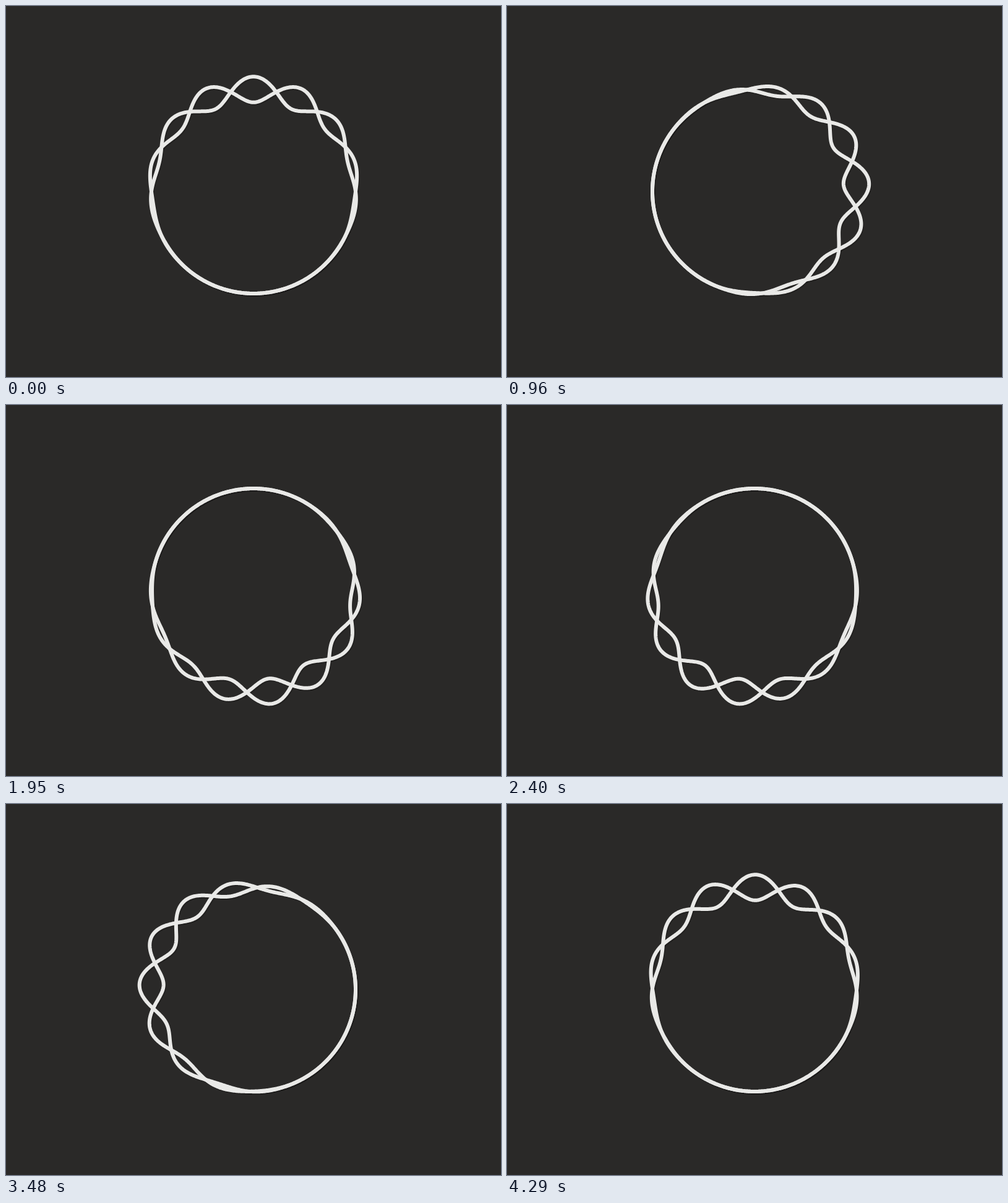
These frames come from a looping animation (800 px wide and 600 px high, 4.32 s). An HTML page with a canvas:

```html
<!DOCTYPE html>
<html lang="en">
<head>
<meta charset="utf-8">
<title>Braided ring</title>
<style>
html, body { margin: 0; width: 100%; height: 100%; overflow: hidden; background: #2a2928; }
canvas { display: block; }
</style>
</head>
<body>
<canvas id="stage" width="800" height="600"></canvas>
<script>
const ctx = document.getElementById('stage').getContext('2d');
const LOOP = 4320, STEP = 30;
const RADIUS = 165, SWING = 20.8, FALLOFF = 2.7, WAVES = 7, STEPS = 720;
const TAU = Math.PI * 2;

// One strand: a circle with a wave that swells around the clockwise-moving head.
function strand(p, sign) {
  const path = new Path2D();
  for (let i = 0; i < STEPS; i++) {
    const a = TAU * i / STEPS;
    const swell = Math.pow((1 + Math.cos(a - TAU * p)) / 2, FALLOFF);
    const r = RADIUS + sign * SWING * swell * Math.cos(WAVES * a + 3 * Math.PI * p);
    path.lineTo(400 + r * Math.sin(a), 300 - r * Math.cos(a));
  }
  path.closePath();
  return path;
}

function draw(p) {
  const strands = [strand(p, 1), strand(p, -1)];
  ctx.fillStyle = '#2a2928';
  ctx.fillRect(0, 0, 800, 600);
  ctx.lineJoin = 'round';
  ctx.lineWidth = 6;

  ctx.save();
  ctx.translate(1.5, 2);
  ctx.strokeStyle = 'rgba(0, 0, 0, 0.2)';
  strands.forEach(s => ctx.stroke(s));
  ctx.restore();

  ctx.strokeStyle = '#e9e9e7';
  strands.forEach(s => ctx.stroke(s));
}

const start = performance.now();
function tick() {
  const t = Math.max(0, performance.now() - start) % LOOP;
  draw(Math.floor(t / STEP) * STEP / LOOP);
  requestAnimationFrame(tick);
}
tick();
</script>
</body>
</html>
```
